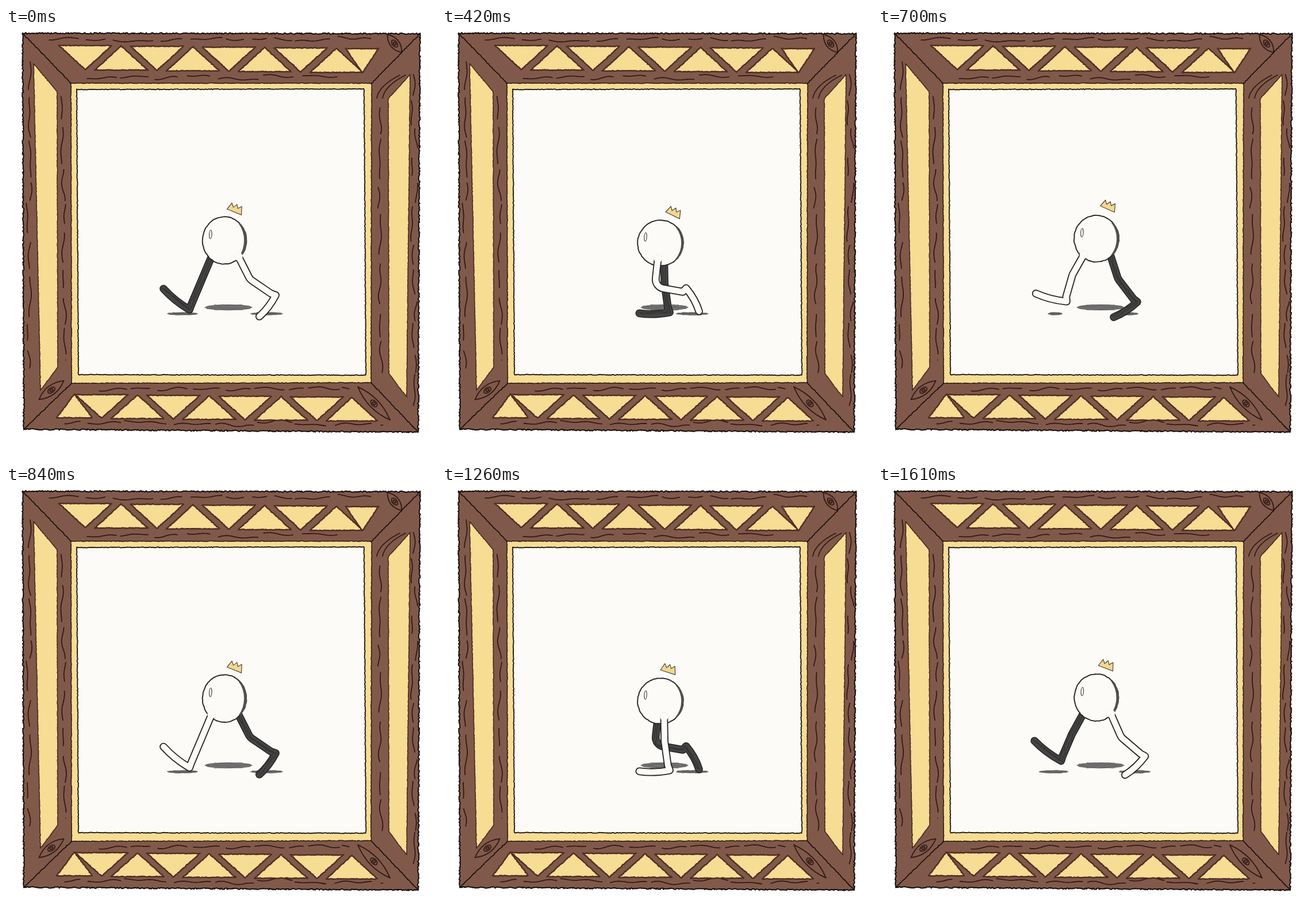
An HTML page with a canvas for the animation above (1680 ms loop, 748 by 748 pixels).

```html
<!DOCTYPE html>
<html lang="en">
<head>
<meta charset="utf-8">
<title>Walking head in a wooden frame</title>
<style>
  html, body { margin: 0; width: 100%; height: 100%; overflow: hidden; background: #fff; }
  canvas { display: block; width: 748px; height: 748px; }
</style>
</head>
<body>
<canvas id="stage" width="748" height="748"></canvas>
<script>
const SIZE = 748, LOOP = 1680, HALF = LOOP / 2, STEP = 70, TAU = Math.PI * 2;
const BROWN = '#81594b', YELLOW = '#f7dc94', PAPER = '#fcfbf7', INK = '#242424', GRAIN = '#301b16';
const ctx = document.getElementById('stage').getContext('2d');

function seeded(seed) {
  return () => {
    seed = (seed * 1664525 + 1013904223) >>> 0;
    return seed / 4294967296;
  };
}

function trace(c, points, closed) {
  c.beginPath();
  points.forEach(([x, y]) => c.lineTo(x, y));
  if (closed) c.closePath();
}

function roughen(points, amp, rand, closed, gap = 2) {
  const out = [];
  const all = closed ? [...points, points[0]] : points;
  const jitter = () => (rand() - 0.5) * 2 * amp;
  for (let i = 1; i < all.length; i++) {
    const [ax, ay] = all[i - 1], [bx, by] = all[i];
    const n = Math.max(1, Math.round(Math.hypot(bx - ax, by - ay) / gap));
    for (let k = 0; k < n; k++) {
      out.push([ax + (bx - ax) * k / n + jitter(), ay + (by - ay) * k / n + jitter()]);
    }
  }
  out.push(all[all.length - 1]);
  return out;
}

function curve(c, x0, y0, cx, cy, x1, y1) {
  c.beginPath();
  c.moveTo(x0, y0);
  c.quadraticCurveTo(cx, cy, x1, y1);
  c.stroke();
}

/* ---------- frame ---------- */

const corners = [[29, 9], [720, 10], [717, 703], [31, 698]];
const bandOuter = [[113, 96], [636, 96], [635, 617], [114, 618]];
const bandInner = [[123, 107], [623, 106], [626, 604], [126, 603]];
const panels = [
  [[48, 62], [89, 111], [90, 590], [60, 630]],
  [[703, 81], [665, 123], [666, 601], [697, 642]]
];

// Alternating triangles, cut off at the ends of the row.
function triangleRow(first, y, height, min, max, startsUp) {
  return Array.from({ length: 9 }, (_, i) => {
    const centre = first + i * 62.4;
    const left = Math.max(min, centre - 46), right = Math.min(max, centre + 46);
    const top = y + (centre - 100) * 0.011;
    const up = (i % 2 === 0) === startsUp;
    const base = up ? top + height : top, apex = up ? top : top + height;
    return [[left, base], [right, base], [(left + right) / 2, apex]];
  });
}

// Wavy lines of random length along one strip of wood.
function grainStrip(c, centre, spread, from, to, vertical, rand) {
  for (let s = from; s < to;) {
    const end = Math.min(to, s + 25 + rand() * 50);
    const base = centre + (rand() - 0.5) * 2 * spread;
    const phase = rand() * TAU, size = 1 + rand();
    const points = [];
    for (; s <= end; s += 3) {
      const off = base + Math.sin(s / 8 + phase) * size + Math.sin(s / 17 + phase) * 1.5;
      points.push(vertical ? [off, s] : [s, off]);
    }
    trace(c, points);
    c.stroke();
    s += rand() * 16;
  }
}

// A leaf shape with a ringed knot in the middle.
function knot(c, x, y, length, angle) {
  c.save();
  c.translate(x, y);
  c.rotate(angle);
  for (const bulge of [-16, 16]) curve(c, -length, 0, 0, bulge, length, 0);
  for (const r of [7, 3]) {
    c.beginPath();
    c.ellipse(0, 0, r, r * 0.6, 0, 0, TAU);
    c.stroke();
  }
  c.restore();
}

function paintFrame() {
  const canvas = document.createElement('canvas');
  canvas.width = canvas.height = SIZE;
  const c = canvas.getContext('2d');
  const rand = seeded(7);
  c.lineCap = c.lineJoin = 'round';

  const shape = (points, fill, line, width, amp) => {
    trace(c, roughen(points, amp, rand, true), true);
    c.fillStyle = fill;
    c.fill();
    c.strokeStyle = line;
    c.lineWidth = width;
    c.stroke();
  };

  c.fillStyle = '#fff';
  c.fillRect(0, 0, SIZE, SIZE);
  shape(corners, BROWN, '#140d0b', 2, 1.2);

  c.strokeStyle = GRAIN;
  c.lineWidth = 1.8;
  for (const y of [20, 86]) grainStrip(c, y, 4, y + 55, 665 - y, false, rand);
  for (const y of [628, 688]) grainStrip(c, y, 3, 790 - y, y - 30, false, rand);
  for (const x of [39, 99]) grainStrip(c, x, 4, x + 20, 600 - x / 5, true, rand);
  for (const x of [651, 709]) grainStrip(c, x, 5, 790 - x, x - 50, true, rand);
  knot(c, 676, 27, 20, 0.9);
  knot(c, 79, 630, 27, -0.65);
  knot(c, 640, 653, 40, 0.8);
  for (const x of [645, 655]) curve(c, x, 122, x + 4, 100, x + 40, 82);

  const triangles = [
    ...triangleRow(138, 30, 42, 92, 648, false),
    ...triangleRow(104, 637, 41, 88, 646, true)
  ];
  for (const t of triangles) shape(t, YELLOW, '#4e2d22', 2.4, 0.6);
  for (const p of panels) shape(p, YELLOW, '#46291d', 1.6, 0.5);
  shape(bandOuter, YELLOW, '#2b1d12', 1.6, 0.6);
  shape(bandInner, PAPER, '#17130f', 1.8, 0.6);

  c.strokeStyle = '#140d0b';
  c.lineWidth = 1.6;
  corners.forEach((p, i) => {
    trace(c, roughen([p, bandOuter[i]], 0.7, rand));
    c.stroke();
  });
  return canvas;
}

/* ---------- motion ---------- */

// One leg's cycle: time, ankle x and y, foot angle (toe down is positive), knee bend.
const legKeys = [
  [0, 322, 482, -40, 0],
  [140, 341, 485, 0, 13],
  [490, 406, 487, 1, 0],
  [770, 457, 466, 42, 10],
  [980, 469, 454, 70, 13],
  [1260, 419, 459, 118, 34],
  [1400, 340, 462, 29, 10],
  [1610, 321, 470, -38, 2]
];
// One step of the body: time, centre y, squash, crown y.
const bodyKeys = [[0, 369.5, -1.5, 315], [140, 394.5, 5, 333], [420, 374, 0, 320], [560, 363.5, 0, 304]];

function sample(keys, time, period) {
  let i = keys.length - 1;
  while (keys[i][0] > time) i--;
  const a = keys[i], b = keys[(i + 1) % keys.length];
  const end = i + 1 < keys.length ? b[0] : period;
  const u = (time - a[0]) / (end - a[0]);
  return a.slice(1).map((v, k) => v + (b[k + 1] - v) * u);
}

function bodyPose(time) {
  const [y, squash, crownY] = sample(bodyKeys, time % HALF, HALF);
  return { x: 380, y, squash, crownY, rx: 40.5 + squash, ry: 40.5 - squash };
}

function legPose(time, body) {
  const [ax, ay, degrees, bend] = sample(legKeys, time, LOOP);
  const angle = degrees * Math.PI / 180;
  const cos = Math.cos(angle), sin = Math.sin(angle);
  const hip = [381 - 24 * Math.cos(TAU * (time + 60) / LOOP), body.y + body.ry * 0.67];
  const dx = ax - hip[0], dy = ay - hip[1], reach = Math.hypot(dx, dy);
  const knee = [(hip[0] + ax - 2 * bend * dy / reach) / 2, (hip[1] + ay + 2 * bend * dx / reach) / 2];
  // A point on the foot: forward towards the toe, down towards the sole.
  const foot = (forward, down) => [ax - cos * forward + sin * down, ay + sin * forward + cos * down];
  const length = 50 - 8 * sin;
  return {
    hip, knee, ankle: [ax, ay], heel: foot(-3, 8), arch: foot(length / 2, 13), toe: foot(length, 9),
    shadow: [foot(length / 2, 0)[0] + 6, 497, Math.min(28, 2 + 38 * Math.abs(sin)), 2.4]
  };
}

/* ---------- walker ---------- */

function smudge([x, y, rx, ry], rand) {
  ctx.fillStyle = '#7c7c7c';
  ctx.beginPath();
  ctx.ellipse(x, y, rx, ry, 0, 0, TAU);
  ctx.fill();
  ctx.strokeStyle = '#555';
  ctx.lineWidth = 0.8;
  for (let k = -0.8; k <= 0.8; k += 0.4) {
    const half = rx * Math.sqrt(1 - k * k);
    trace(ctx, roughen([[x - half, y + ry * k], [x + half, y + ry * k]], 0.7, rand, false, 5));
    ctx.stroke();
  }
}

function drawLeg({ hip, knee, ankle, heel, arch, toe }, dark, rand) {
  const path = new Path2D();
  path.moveTo(...hip);
  path.arcTo(...knee, ...ankle, 16);
  path.lineTo(...ankle);
  path.lineTo(...heel);
  path.quadraticCurveTo(...arch, ...toe);
  ctx.strokeStyle = INK;
  ctx.lineWidth = 13.6;
  ctx.stroke(path);
  ctx.strokeStyle = dark ? '#444' : PAPER;
  ctx.lineWidth = dark ? 10.6 : 10;
  ctx.stroke(path);
  if (dark) {
    ctx.strokeStyle = '#303030';
    ctx.lineWidth = 1.3;
    for (const off of [-2.5, 1.5]) {
      const line = [hip, knee, ankle, heel, toe].map(([x, y]) => [x + off, y + off / 2]);
      trace(ctx, roughen(line, 1.2, rand, false, 6));
      ctx.stroke();
    }
  } else {
    // Opens the outline where the leg joins the body.
    ctx.fillStyle = PAPER;
    ctx.beginPath();
    ctx.arc(...hip, 7.2, 0, TAU);
    ctx.fill();
  }
}

function drawBody({ x, y, rx, ry, squash }, rand) {
  const rim = [];
  for (let a = 0; a < TAU; a += 0.09) {
    const wobble = (rand() - 0.5) * 0.9 - 0.8;
    rim.push([x + (rx + wobble) * Math.cos(a), y + (ry + wobble) * Math.sin(a)]);
  }
  trace(ctx, rim, true);
  ctx.fillStyle = PAPER;
  ctx.fill();
  ctx.strokeStyle = INK;
  ctx.lineWidth = 1.9;
  ctx.stroke();

  ctx.fillStyle = '#505050';
  ctx.beginPath();
  ctx.ellipse(x, y, rx, ry, 0, -0.75, 0.75);
  ctx.ellipse(x, y, rx - 4.3 + squash * 0.4, ry, 0, 0.75, -0.75, true);
  ctx.fill();

  ctx.strokeStyle = '#4a4a4a';
  ctx.lineWidth = 1.2;
  ctx.beginPath();
  ctx.ellipse(x - 26 - squash * 1.2, y - 10.5, 2.2, 7.5, 0.05, 0, TAU);
  ctx.stroke();
}

function drawCrown(time, y) {
  const sway = Math.sin(TAU * time / LOOP);
  ctx.save();
  ctx.translate(384.5 + 4.5 * sway, y);
  ctx.rotate((22 + 4 * sway) * Math.PI / 180);
  trace(ctx, [[0, 0], [4, -13], [9, -7], [13, -14], [17, -8], [22, -14], [27, 0]], true);
  ctx.fillStyle = '#f5d68f';
  ctx.fill();
  ctx.strokeStyle = '#4b4940';
  ctx.lineWidth = 1.2;
  ctx.stroke();
  ctx.restore();
}

const frame = paintFrame();

function draw(time) {
  const rand = seeded(time + 31);
  const body = bodyPose(time);
  const darkLeg = legPose(time, body);
  const paleLeg = legPose((time + HALF) % LOOP, body);
  ctx.drawImage(frame, 0, 0);
  ctx.lineCap = ctx.lineJoin = 'round';

  smudge([387, 486, 41, 5.2], rand);
  smudge(darkLeg.shadow, rand);
  smudge(paleLeg.shadow, rand);
  drawLeg(darkLeg, true, rand);
  drawBody(body, rand);
  drawLeg(paleLeg, false, rand);
  drawCrown(time, body.crownY);
}

const start = performance.now();
function tick() {
  const elapsed = (performance.now() - start) % LOOP;
  draw(Math.floor(elapsed / STEP) * STEP);
  requestAnimationFrame(tick);
}
tick();
</script>
</body>
</html>
```
